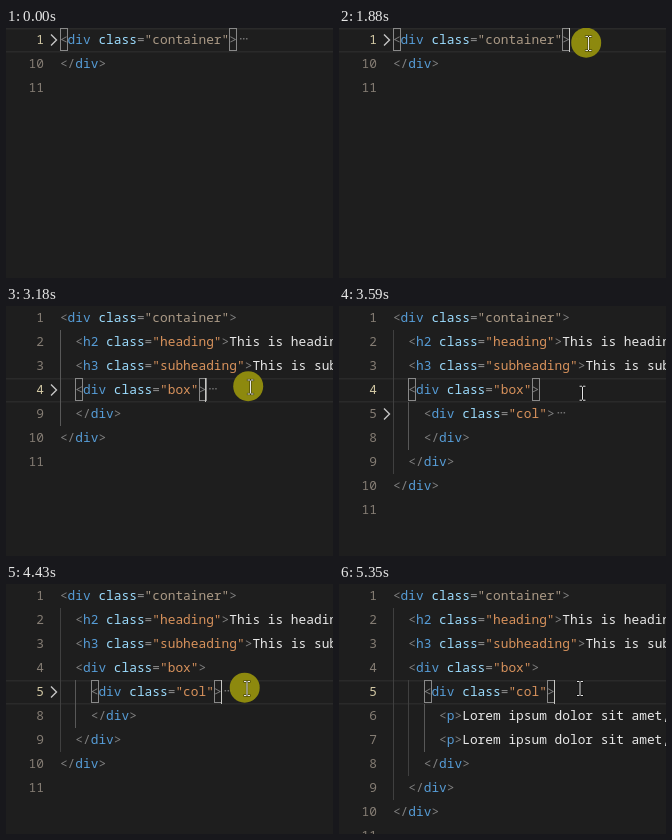
An HTML page with a canvas that plays this animation: 327x250 px, repeating every 5580 ms.

```html
<!DOCTYPE html>
<html lang="en">
<head>
<meta charset="utf-8">
<title>Unfolding code</title>
<style>
html, body { margin: 0; width: 100%; height: 100%; overflow: hidden; background: #1e1e1e; }
canvas { display: block; width: 327px; height: 250px; }
</style>
</head>
<body>
<canvas id="stage"></canvas>
<script>
const W = 327, H = 250, LOOP = 5580;
const CHAR = 7.7, ROW = 24, LEFT = 53.9;
const FONT = '12.83px "Noto Sans Mono", "DejaVu Sans Mono", monospace';
const COLOR = {
  punct: '#808080', tag: '#569cd6', attr: '#9cdcfe', equals: '#8c8c8c',
  string: '#d8925c', outer: '#ab9a86', text: '#e8e8e8',
  number: '#857d74', current: '#d2c8a4'
};

const LINES = [
  [0, '<div class="container">'],
  [1, '<h2 class="heading">This is heading</h2>'],
  [1, '<h3 class="subheading">This is subheading</h3>'],
  [1, '<div class="box">'],
  [2, '<div class="col">'],
  [3, '<p>Lorem ipsum dolor sit amet, consectetur</p>'],
  [3, '<p>Lorem ipsum dolor sit amet, consectetur</p>'],
  [2, '</div>'],
  [1, '</div>'],
  [0, '</div>'],
  [0, '']
].map(([depth, code], i) => ({ num: i + 1, depth, code, parts: tokens(code, depth) }));

// Folded ranges per unfold level: header line, first and last hidden line
const FOLDS = [[1, 2, 9], [4, 5, 8], [5, 6, 7]];
const UNFOLDS = [2030, 3230, 4480];
const CLICKS = [
  { at: 1880, end: 2030, line: 1 },
  { at: 2950, end: 3230, line: 4 },
  { at: 4330, end: 4480, line: 5 }
];
const BLINK = 510;

// Pointer path: time, x, y
const PATH = [
  [1050, 253, -4], [1230, 249.5, 6], [1380, 249.5, 7], [1460, 249.5, 15.5],
  [2390, 249.5, 15.5], [2900, 245, 78], [3050, 244.5, 81],
  [3410, 244.5, 81], [3920, 241, 102.5], [4150, 241, 104.5]
];

const canvas = document.getElementById('stage');
const ctx = canvas.getContext('2d');
const scale = window.devicePixelRatio || 1;
canvas.width = W * scale;
canvas.height = H * scale;

function tokens(code, depth) {
  const parts = [];
  const rule = /(<\/?)(\w+)|( class)(=)("[^"]*")|(>)|([^<>]+)/g;
  const string = depth ? 'string' : 'outer';
  const kinds = ['punct', 'tag', 'attr', 'equals', string, 'punct', 'text'];
  let col = 0;
  for (const m of code.matchAll(rule)) {
    kinds.forEach((kind, i) => {
      const s = m[i + 1];
      if (!s) return;
      parts.push({ kind, s, col });
      col += s.length;
    });
  }
  return parts;
}

function rect(x, y, w, h, color) {
  ctx.fillStyle = color;
  ctx.fillRect(x, y, w, h);
}

function write(s, x, y, color) {
  ctx.fillStyle = color;
  ctx.fillText(s, x, y);
}

function polyline(points, color, width) {
  ctx.beginPath();
  points.forEach(([x, y]) => ctx.lineTo(x, y));
  ctx.strokeStyle = color;
  ctx.lineWidth = width;
  ctx.stroke();
}

function pointerAt(t) {
  if (t < PATH[0][0]) return null;
  const i = PATH.findIndex(p => p[0] > t);
  if (i < 0) return PATH[PATH.length - 1].slice(1);
  const [t0, x0, y0] = PATH[i - 1], [t1, x1, y1] = PATH[i];
  const u = (t - t0) / (t1 - t0), e = u * u * (3 - 2 * u);
  return [x0 + (x1 - x0) * e, y0 + (y1 - y0) * e];
}

function drawPointer([x, y]) {
  const bars = [[-3, -7.5, 2.5, 1], [0.5, -7.5, 2.5, 1], [-0.5, -6.5, 1, 13],
                [-3, 6.5, 2.5, 1], [0.5, 6.5, 2.5, 1]];
  bars.forEach(([a, b, w, h]) => rect(x + a - 0.6, y + b - 0.6, w + 1.2, h + 1.2, 'rgba(0,0,0,.5)'));
  bars.forEach(([a, b, w, h]) => rect(x + a, y + b, w, h, '#e6e6e6'));
}

function drawBracket(x, y) {
  ctx.strokeStyle = '#888';
  ctx.lineWidth = 1;
  ctx.strokeRect(Math.round(x) + 0.5, y + 0.5, 7, 22);
}

function drawFoldMarks(x, y, end) {
  polyline([[x, y - 5.5], [x + 5.5, y], [x, y + 5.5]], '#c5c5c5', 1.4);
  for (let i = 0; i < 3; i++) rect(end + 3 + i * 3, y - 1.8, 1.5, 1.2, '#858585');
}

function drawLine(line, top, level, active, caretOn) {
  const x = LEFT + line.depth * 2 * CHAR;
  const end = x + line.code.length * CHAR;
  const base = top + 16.3;
  const current = line.num === active;

  if (current) {
    rect(0, top, W, 1.5, '#2a2a2a');
    rect(0, top + 23, W, 1.5, '#2a2a2a');
  }
  for (let d = 0; d < line.depth; d++) {
    const gx = Math.round(LEFT + d * 2 * CHAR);
    rect(gx, top, 1, ROW, d === level - 1 ? '#585858' : '#404040');
  }
  if (current) {
    drawBracket(x, top);
    drawBracket(end - CHAR, top);
  }
  const num = String(line.num);
  write(num, 38 - num.length * CHAR, base, current ? COLOR.current : COLOR.number);
  line.parts.forEach(p => write(p.s, x + p.col * CHAR, base, COLOR[p.kind]));

  if (level < FOLDS.length && FOLDS[level][0] === line.num) drawFoldMarks(45, top + 12, end);
  if (current && caretOn) rect(Math.round(end) - 1, top, 1, ROW, '#c8c8c4');
}

function draw(t) {
  ctx.setTransform(scale, 0, 0, scale, 0, 0);
  rect(0, 0, W, H, '#1e1e1e');
  ctx.font = FONT;
  ctx.textBaseline = 'alphabetic';

  const level = UNFOLDS.filter(u => t >= u).length;
  const click = CLICKS.filter(c => t >= c.at).pop();
  const active = click ? click.line : 1;
  const caretOn = click && Math.floor((t - click.at) / BLINK) % 2 === 0;
  const [, from, to] = FOLDS[level] || [0, 0, 0];

  LINES.filter(l => l.num < from || l.num > to)
    .forEach((l, i) => drawLine(l, i * ROW, level, active, caretOn));

  const pos = pointerAt(t);
  if (!pos) return;
  if (click && t < click.end) {
    ctx.beginPath();
    ctx.arc(pos[0] - 2.3, pos[1] - 0.8, 15, 0, Math.PI * 2);
    ctx.fillStyle = 'rgba(146,142,14,.96)';
    ctx.fill();
  }
  drawPointer(pos);
}

const start = performance.now();
function tick() {
  draw((performance.now() - start) % LOOP);
  requestAnimationFrame(tick);
}
tick();
</script>
</body>
</html>
```
